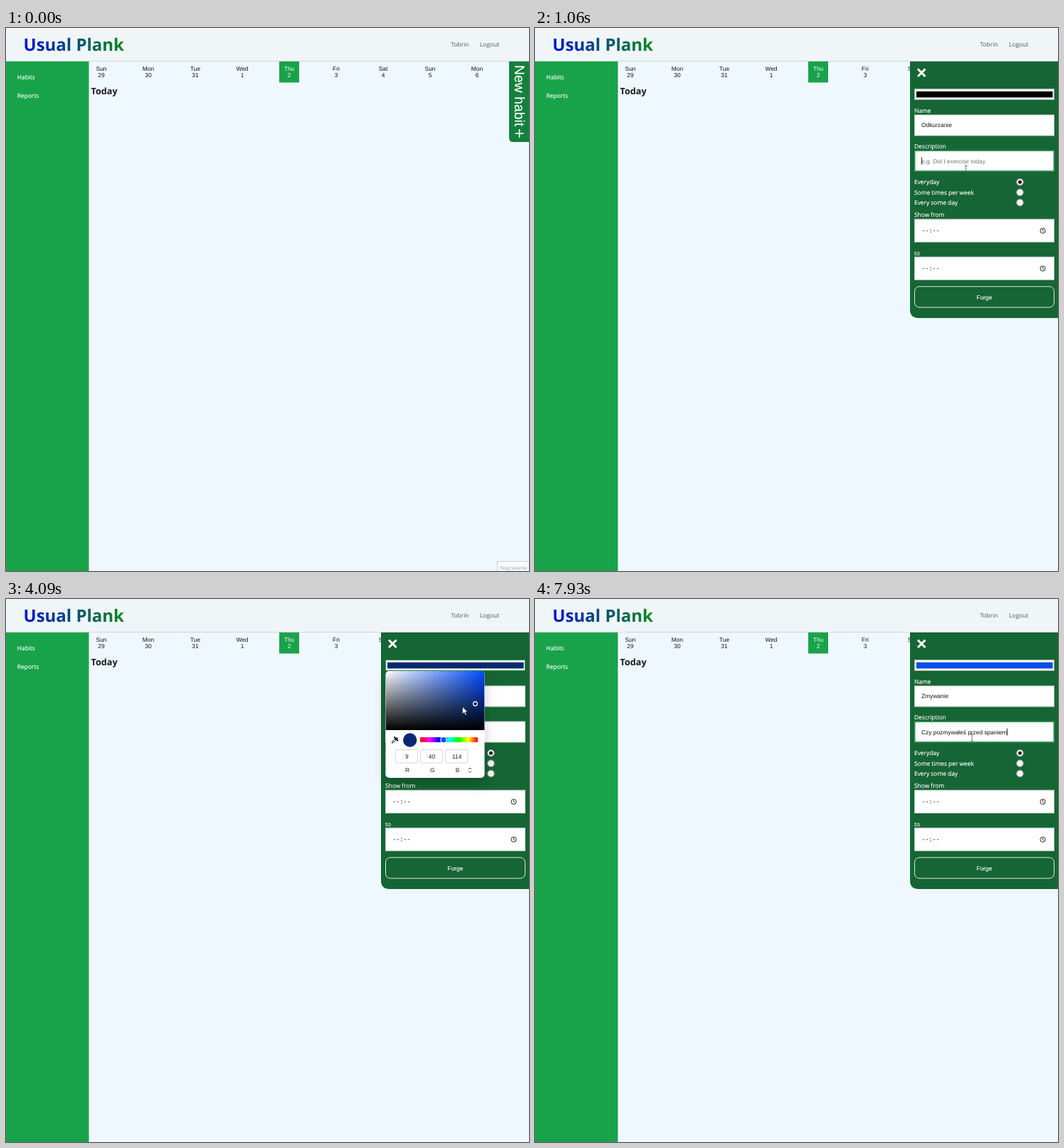
An HTML page that plays this animation: 735 by 762 pixels, repeating every 8 s.

```html
<!DOCTYPE html>
<html lang="en">
<head>
<meta charset="utf-8">
<title>Habit tracker</title>
<style>
html, body { margin: 0; width: 100%; height: 100%; overflow: hidden; background: #f0f8ff; }
svg { display: block; width: 100vw; height: 100vh; }
text { font: 8.4px "Open Sans", sans-serif; text-rendering: geometricPrecision; white-space: pre; }
.arial text, text.arial { font-family: "Liberation Sans", Arial, sans-serif; }
.mid { text-anchor: middle; }
.white { fill: #fff; stroke: #fff; stroke-width: .15; }
.mono { font-family: "Liberation Mono", monospace; }
.field { fill: #fff; stroke: #c3cec8; }
.field.focus { stroke: #2c8a50; stroke-width: 1.8; }
</style>
</head>
<body>
<svg viewBox="0 0 735 762">
  <defs>
    <linearGradient id="brand"><stop stop-color="#0012d2"/><stop offset="1" stop-color="#078a1b"/></linearGradient>
    <linearGradient id="toWhite"><stop stop-color="#fff"/><stop offset="1" stop-color="#fff" stop-opacity="0"/></linearGradient>
    <linearGradient id="toBlack" x2="0" y2="1"><stop stop-opacity="0"/><stop offset="1"/></linearGradient>
    <linearGradient id="rainbow">
      <stop stop-color="#f00"/><stop offset=".167" stop-color="#f0f"/><stop offset=".333" stop-color="#00f"/>
      <stop offset=".5" stop-color="#0ff"/><stop offset=".667" stop-color="#0f0"/>
      <stop offset=".833" stop-color="#ff0"/><stop offset="1" stop-color="#f00"/>
    </linearGradient>
    <filter id="shadow" x="-30%" y="-30%" width="160%" height="170%">
      <feDropShadow dx="0" dy="9" stdDeviation="9" flood-opacity=".2"/>
    </filter>
    <clipPath id="pickerClip"><rect x="533.5" y="101" width="139" height="150" rx="5"/></clipPath>
  </defs>

  <rect width="735" height="762" fill="#f0f8ff"/>
  <rect width="735" height="46" fill="#f0f5f8"/>
  <rect y="46" width="735" height="1" fill="#cdd6da"/>
  <text x="24.5" y="32" fill="url(#brand)" style="font-size:24px;font-weight:700">Usual Plank</text>
  <g fill="#4b5563"><text x="625.5" y="26.3">Tobrin</text><text x="666" y="26.3">Logout</text></g>

  <rect y="47" width="116.5" height="715" fill="#18a34a"/>
  <g class="white"><text x="15.8" y="72.3">Habits</text><text x="15.8" y="98">Reports</text></g>

  <rect x="384" y="47" width="28" height="29.5" fill="#18a34a"/>
  <g id="days" class="arial mid"></g>
  <text x="119.6" y="92.7" fill="#1a1a1a" style="font-size:12.6px;font-weight:700">Today</text>

  <g id="notice">
    <rect x="690.5" y="748.5" width="60" height="30" fill="#f8fbfd" stroke="#cbd2d6"/>
    <text x="694.5" y="759.6" fill="#9aa0a4" style="font-size:6.8px">Nagrywanie</text>
  </g>

  <g id="tab">
    <path d="M735 47H707V154q0 6 6 6H735Z" fill="#15803d"/>
    <text class="arial white" transform="translate(715 52) rotate(90)" style="font-size:19.4px">New habit</text>
    <path d="M721.5 142v12M715.5 148h12" stroke="#fff" stroke-width="1.6"/>
  </g>

  <g id="panel">
    <path d="M735 47H527V395q0 12 12 12H735Z" fill="#166534"/>
    <path d="M538 57.5l10.5 10.5M548.5 57.5l-10.5 10.5" stroke="#fff" stroke-width="3"/>
    <rect id="colourField" x="533.5" y="85.5" width="196" height="15" fill="#f4f4f4" stroke="#aab5ae"/>
    <rect id="swatch" x="536" y="89" width="191.5" height="8.3" stroke="#777" stroke-width=".5"/>
    <g class="white">
      <text x="533" y="119">Name</text><text x="533" y="169.2">Description</text>
      <text x="533" y="219.3">Everyday</text><text x="533" y="233.7">Some times per week</text>
      <text x="533" y="248">Every some day</text>
      <text x="533" y="265.3">Show from</text><text x="533" y="318.6">to</text>
    </g>
    <rect id="nameField" class="field" x="533.5" y="122" width="196" height="29"/>
    <rect id="selection" y="131" height="10" fill="#2f7fe0"/>
    <text id="nameText" class="arial" x="543" y="139.4"></text>
    <rect id="descField" class="field" x="533.5" y="172" width="196" height="29"/>
    <text id="descText" class="arial" x="543" y="189.6"></text>
    <rect id="caret" width=".9" height="10" fill="#111"/>
    <g fill="#f3f3f3" stroke="#7b8580">
      <circle cx="681.5" cy="216.2" r="4.9"/><circle cx="681.5" cy="230.7" r="4.9"/><circle cx="681.5" cy="245" r="4.9"/>
    </g>
    <circle cx="681.5" cy="216.2" r="2.5" fill="#222"/>
    <g id="times"></g>
    <rect x="533.5" y="362.8" width="196" height="29.2" rx="6.5" fill="none" stroke="#dfeae3"/>
    <text class="arial mid white" x="631.5" y="380.5">Forge</text>
  </g>

  <g id="picker">
    <rect x="533.5" y="101" width="139" height="150" rx="5" fill="#fff" filter="url(#shadow)"/>
    <g clip-path="url(#pickerClip)">
      <rect id="hueArea" x="533.5" y="101" width="139" height="83"/>
      <rect x="533.5" y="101" width="139" height="83" fill="url(#toWhite)"/>
      <rect x="533.5" y="101" width="139" height="83" fill="url(#toBlack)"/>
    </g>
    <g id="shadeKnob" fill="none"><circle r="3.9" stroke="#000"/><circle r="3" stroke="#fff" stroke-width="1.3"/></g>
    <path d="M542.5 202l.5-2 4-4 1.5 1.5-4 4Z" fill="none" stroke="#111"/>
    <path d="M546 194l4.5 4.5M548 197l1.8-1.8" stroke="#111" stroke-width="2" stroke-linecap="round"/>
    <circle id="sample" cx="567.7" cy="198" r="9.7"/>
    <rect x="582" y="194" width="81" height="7" rx="1" fill="url(#rainbow)"/>
    <circle id="hueKnob" cy="197.6" r="4.2" stroke="#fff" stroke-width="1.2"/>
    <g id="channels" class="arial mid"></g>
    <path d="M650 239l2-2 2 2M650 241.5l2 2 2-2" fill="none" stroke="#333" stroke-width=".9"/>
  </g>

  <path id="arrow" d="M0 0V10.5L2.5 8.3 4.3 12 6 11.2 4.3 7.7H7.5Z" fill="#fff" stroke="#222" stroke-width=".8"/>
  <path id="beam" d="M-2.2-4.5H2.2M-2.2 4.5H2.2M0-4.5V4.5" fill="none" stroke="#555" stroke-width=".8"/>
</svg>
<script>
const LOOP = 8000, OPEN_AT = 482, OPEN_FOR = 340;
const $ = id => document.getElementById(id);
const clamp = (v, lo = 0, hi = 1) => Math.min(hi, Math.max(lo, v));
const show = (id, on) => { $(id).style.display = on ? '' : 'none'; };
const move = (id, x, y) => $(id).setAttribute('transform', `translate(${x} ${y})`);
const within = (t, from, to) => t >= from && t < to;

$('days').innerHTML = 'Sun 29,Mon 30,Tue 31,Wed 1,Thu 2,Fri 3,Sat 4,Sun 5,Mon 6'.split(',').map((day, i) => {
  const [name, date] = day.split(' '), x = 134 + 66 * i, fill = i === 4 ? '#fff' : '#111';
  return `<text x="${x}" y="60" fill="${fill}">${name}</text><text x="${x}" y="69" fill="${fill}">${date}</text>`;
}).join('');

$('times').innerHTML = [268.3, 321.3].map(y => `
  <rect class="field" x="533.5" y="${y}" width="196" height="32"/>
  <text class="mono" x="543.5" y="${y + 19}">--:--</text>
  <g fill="none" stroke="#111" stroke-width=".9"><circle cx="713.6" cy="${y + 16.2}" r="3.6"/>
  <path d="M713.6 ${y + 13.8}v2.6l1.8 1.2"/></g>`).join('');

$('channels').innerHTML = [...'RGB'].map((letter, i) => {
  const x = 563.3 + 35.2 * i;
  return `<rect x="${x - 15.8}" y="211.5" width="31" height="18.5" rx="1" fill="#fff" stroke="#ccc" stroke-width=".8"/>
    <text id="value${i}" x="${x}" y="223.6" fill="#222"></text><text x="${x + .8}" y="243" fill="#222">${letter}</text>`;
}).join('');

// Eased interpolation through [time, ...values] rows.
function along(rows, t) {
  if (t <= rows[0][0]) return rows[0].slice(1);
  const next = rows.findIndex(row => row[0] > t);
  if (next < 0) return rows.at(-1).slice(1);
  const a = rows[next - 1], b = rows[next];
  const p = (t - a[0]) / (b[0] - a[0]), e = p * p * (3 - 2 * p);
  return a.slice(1).map((v, i) => v + (b[i + 1] - v) * e);
}

const pointer = [
  [30, 737, 190], [440, 716, 112], [480, 716, 112], [550, 692, 107], [700, 640, 220], [850, 612, 327],
  [1000, 605.5, 198], [1080, 605.5, 198], [1220, 592, 137], [1260, 592, 137], [1420, 520, 140], [1460, 520, 144],
  [2990, 520, 144], [3210, 590, 93], [3280, 590, 93], [3400, 600, 130], [3560, 659.5, 147], [3680, 634, 189],
  [3780, 622, 197], [3980, 615, 197], [4200, 667, 106], [4300, 667, 106], [4590, 622, 196], [4850, 614, 194.5]
];
const shade = [[3370, 534, 184], [3400, 600, 130], [3560, 659.5, 147], [4160, 659.5, 147], [4260, 666.5, 106]];
const hueTrack = [[3760, 585.5], [3820, 622], [3980, 615]];

function toRgb(hue, sat, val) {
  return [5, 3, 1].map(n => {
    const k = (n + hue / 60) % 6;
    return Math.round(255 * val * (1 - sat * clamp(Math.min(k, 4 - k))));
  });
}

// Typing bursts: text lengths spread evenly between two times.
const range = (a, b) => Array.from({ length: Math.abs(b - a) + 1 }, (_, i) => a + Math.sign(b - a) * i);
const burst = (from, to, lengths) =>
  lengths.map((n, i) => [from + (to - from) * i / Math.max(1, lengths.length - 1), n]);
const typedLength = (steps, t) => (steps.findLast(step => step[0] <= t + .5) || [0, 0])[1];

const NAME = 'Zmywanie', DESC = 'Czy pozmywałeś przed spaniem';
const nameSteps = burst(2320, 2720, range(1, 8));
const descSteps = [
  ...burst(5180, 5180, [1]),
  ...burst(5350, 5520, range(2, 5)),
  ...burst(5690, 6470, [...range(4, 1), ...range(2, 8)]),
  ...burst(6570, 6790, range(9, 13)),
  ...burst(6990, 7770, range(14, 25)),
  ...burst(7870, 7930, range(26, 28))
];

function drawPicker(t) {
  const [x, y] = along(shade, t), [hx] = along(hueTrack, t);
  const hue = (360 * (1 - (hx - 585.5) / 77)) % 360;
  const rgb = toRgb(hue, clamp((x - 533.5) / 137), clamp((184 - y) / 83));
  const colour = `rgb(${rgb})`, pure = `hsl(${hue} 100% 50%)`;
  const open = within(t, 3250, 4560);
  show('picker', open);
  $('swatch').setAttribute('fill', colour);
  $('sample').setAttribute('fill', colour);
  $('hueArea').setAttribute('fill', pure);
  $('hueKnob').setAttribute('fill', pure);
  $('hueKnob').setAttribute('cx', hx);
  $('colourField').setAttribute('stroke', open ? '#2c8a50' : '#aab5ae');
  move('shadeKnob', x, y);
  rgb.forEach((v, i) => { $('value' + i).textContent = v; });
  return open;
}

function drawFields(t, px) {
  const nameFocus = within(t, 1240, 3250), descFocus = within(t, 990, 1240) || t >= 4620;
  $('nameField').classList.toggle('focus', nameFocus);
  $('descField').classList.toggle('focus', descFocus);

  const selecting = within(t, 1260, 2320), left = clamp(px, 543, 586.5);
  show('selection', selecting);
  $('selection').setAttribute('x', left);
  $('selection').setAttribute('width', 586.5 - left);
  $('nameText').textContent = t < 2320 ? 'Odkurzanie' : NAME.slice(0, typedLength(nameSteps, t));
  $('nameText').setAttribute('fill', selecting && left < 550 ? '#fff' : '#111');

  const length = typedLength(descSteps, t);
  $('descText').textContent = length ? DESC.slice(0, length) : 'e.g. Did I exercise today';
  $('descText').setAttribute('fill', length ? '#111' : '#757575');

  const blinkOff = within(t, 4850, 5150);
  show('caret', (nameFocus && t >= 2320) || (descFocus && !blinkOff));
  const width = nameFocus ? $('nameText').getComputedTextLength()
    : length ? $('descText').getComputedTextLength() : 0;
  move('caret', 543 + width, nameFocus ? 131.2 : 181.6);
}

function draw(t) {
  const sliding = clamp((t - OPEN_AT) / OPEN_FOR);
  move('panel', 208 * (1 - sliding) ** 2, 0);
  show('panel', t >= OPEN_AT);
  show('tab', t < OPEN_AT);
  show('notice', t < 200);

  const open = drawPicker(t);
  const [x, y] = along(pointer, t);
  drawFields(t, x);

  const overField = x > 533 && x < 730 &&
    [[122, 151], [172, 202], [268, 301], [321, 354]].some(([top, end]) => y > top && y < end);
  const beam = t >= 830 && !open && overField;
  show('beam', beam);
  show('arrow', !beam && t >= 30);
  move(beam ? 'beam' : 'arrow', x, y);
}

const start = performance.now();
function tick() {
  draw((performance.now() - start) % LOOP);
  requestAnimationFrame(tick);
}
tick();
</script>
</body>
</html>
```
